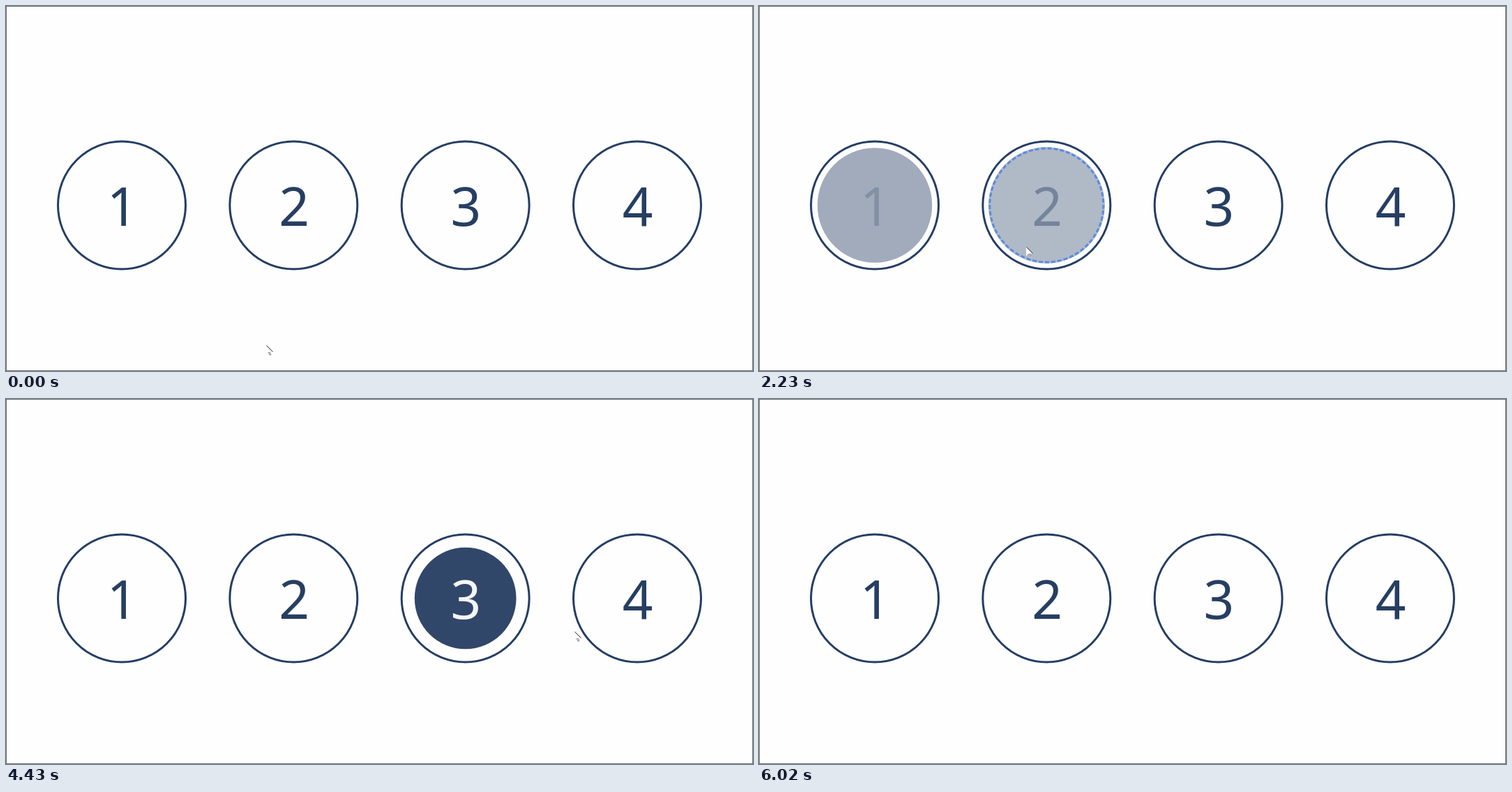
Write an HTML page that moves like this. It is 1071 px wide and 523 px high and loops after 6270 ms.

```html
<!DOCTYPE html>
<html lang="en">
<head>
<meta charset="utf-8">
<title>Hover circles</title>
<style>
  html, body { margin: 0; width: 100%; height: 100%; overflow: hidden; background: #fefefe; }
  svg { display: block; width: 1071px; height: 523px; }
  .frame { fill: #fefefe; stroke: #6c6c6c; }
  .edge { fill: none; stroke: #243d64; stroke-width: 3; }
  .ring { fill: none; stroke: #5b8be0; stroke-width: 3; }
  .disc { fill: #263e62; }
  .digit { font: 76.5px "Noto Sans", "Open Sans", sans-serif; text-anchor: middle; }
  .beam { fill: none; stroke: #fff; mix-blend-mode: difference; }
</style>
</head>
<body>
<svg viewBox="0 0 1071 523">
  <rect class="frame" x=".5" y=".5" width="1070" height="522"/>
  <g id="items"></g>
  <g id="arrow" fill="none">
    <path d="M0 0V13L3 10.5 5 15.5 7.5 14.5 5.5 9.5H9.5Z" fill="#fefefe"/>
    <path d="M.5 .5L9.5 9.5" stroke="#222"/>
    <path d="M2.5 11.5L3.5 10.5H5.5M4 11.5L5.3 14.3 6.8 13.5 5.6 10.8" stroke="#555" stroke-width=".8"/>
  </g>
  <path id="beam" class="beam" d="M-3.5 -6.5H-1L0 -5.5 1 -6.5H3.5M0 -5.5V5.5M-3.5 6.5H-1L0 5.5 1 6.5H3.5"/>
</svg>
<script>
const LOOP = 6270, FADE = 500, SPIN = 8000;
const LAST = 6020, STEP = LAST / 46, LEAD = 40;
const CY = 285.5, NAVY = [38, 62, 98];
const RING_R = 81.5, DASHES = 57;

// Hover start and end of each circle, in ms
const hovers = [[620, 2060], [2110, 3175], [3380, 4417], [4505, 5425]];

// Where the pointer turns or rests: time, x, y
const stops = [
  [0, 373, 486], [500, 172, 405], [760, 182, 326], [1750, 182, 326],
  [2400, 457, 352], [2900, 457, 352], [3250, 515, 357], [3660, 670, 329],
  [4000, 676, 329], [4450, 815, 333], [4840, 895, 312], [5240, 895, 312],
  [LAST, 998, 501]
];

const mix = (a, b, k) => a + (b - a) * k;
const bezier = (p, q, u) => 3 * (1 - u) * (1 - u) * u * p + 3 * (1 - u) * u * u * q + u * u * u;

// CSS "ease"
function ease(x) {
  if (x <= 0) return 0;
  if (x >= 1) return 1;
  let lo = 0, hi = 1;
  for (let i = 0; i < 24; i++) {
    const mid = (lo + hi) / 2;
    if (bezier(.25, .25, mid) < x) lo = mid; else hi = mid;
  }
  return bezier(.1, 1, lo);
}

function make(tag, attrs) {
  const el = document.createElementNS("http://www.w3.org/2000/svg", tag);
  for (const key in attrs) el.setAttribute(key, attrs[key]);
  return document.getElementById("items").appendChild(el);
}

function show(el, on) {
  el.setAttribute("visibility", on ? "visible" : "hidden");
}

const arrow = document.getElementById("arrow");
const beam = document.getElementById("beam");
const period = 2 * Math.PI * RING_R / DASHES;

const items = hovers.map(([enter, leave], i) => {
  const cx = 166 + i * 739 / 3;
  make("circle", { class: "edge", cx, cy: CY, r: 91.5 });
  const disc = make("circle", { class: "disc", cx, cy: CY });
  const ring = make("circle", {
    class: "ring", cx, cy: CY, r: RING_R, "stroke-dasharray": `6 ${period - 6}`
  });
  const digit = make("text", { class: "digit", x: cx + .7, y: 315 });
  digit.textContent = i + 1;
  return { enter, leave, cx, disc, ring, digit };
});

function drawItem({ enter, leave, cx, disc, ring, digit }, t) {
  const p = ease((t - enter) / FADE) - ease((t - leave) / FADE);
  disc.setAttribute("r", mix(90, 72, p));
  disc.setAttribute("opacity", p);
  show(ring, t >= enter && t < leave);
  ring.setAttribute("transform", `rotate(${(t - enter) / SPIN * 360} ${cx} ${CY})`);
  digit.setAttribute("fill", `rgb(${NAVY.map(c => Math.round(mix(c, 254, p)))})`);
}

function pointerAt(t) {
  const i = stops.findIndex(stop => stop[0] > t);
  const [t0, x0, y0] = stops[i - 1], [t1, x1, y1] = stops[i];
  const k = (t - t0) / (t1 - t0);
  return [mix(x0, x1, k), mix(y0, y1, k)].map(Math.round);
}

function drawPointer(t) {
  const shown = t < LAST;
  const [x, y] = shown ? pointerAt(t) : [0, 0];
  const onText = items.some(({ cx }) => Math.abs(x - cx) < 23 && Math.abs(y - CY) < 53);
  arrow.setAttribute("transform", `translate(${x} ${y})`);
  beam.setAttribute("transform", `translate(${x - .5} ${y - .5})`);
  show(arrow, shown && !onText);
  show(beam, shown && onText);
}

// The picture is refreshed in even steps and holds in between
function draw(time) {
  const t = Math.min(LAST, Math.floor((time % LOOP + LEAD) / STEP) * STEP);
  items.forEach(item => drawItem(item, t));
  drawPointer(t);
}

const start = performance.now();
function loop() {
  draw(performance.now() - start);
  requestAnimationFrame(loop);
}
loop();
</script>
</body>
</html>
```
